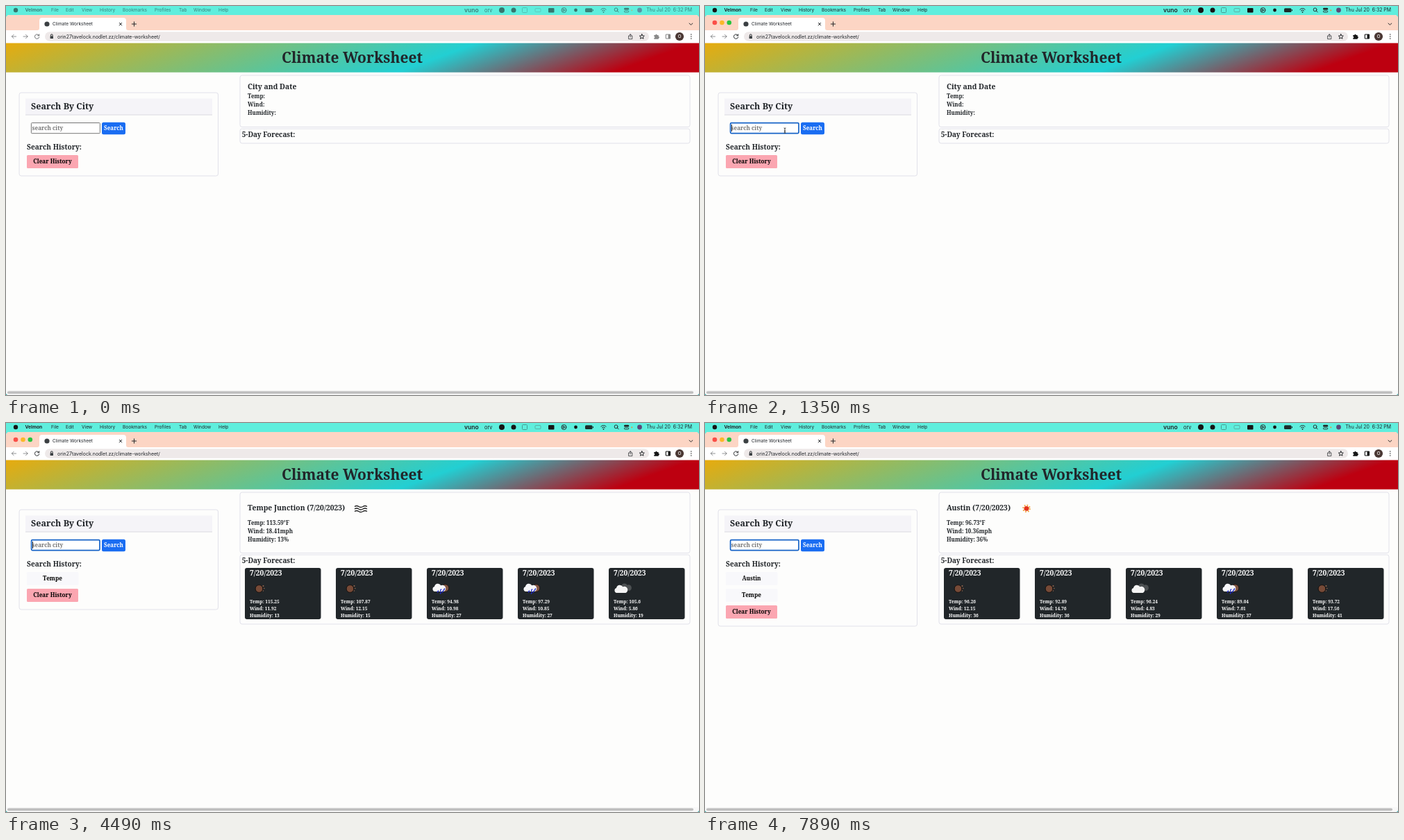
An HTML page that plays this animation: 998 px wide and 561 px high, repeating every 8000 ms.

```html
<!DOCTYPE html>
<html lang="en">
<head>
<meta charset="utf-8">
<title>Climate Worksheet</title>
<style>
  html, body { margin: 0; width: 100%; height: 100%; overflow: hidden; background: #5feedd; }
  svg { display: block; width: 100vw; height: 100vh; }
  text { white-space: pre; }
  .slab { font-family: "Noto Serif", serif; font-weight: 900; fill: #212529; }
  .ui { font-family: Inter, Roboto, sans-serif; fill: #1f2328; }
  .line { fill: none; stroke: #26292c; stroke-width: 1; stroke-linecap: round; stroke-linejoin: round; }
  .panel { fill: none; stroke: #e1e1ea; stroke-width: 1; }
</style>
</head>
<body>
<svg id="stage" viewBox="0 0 998 561">
  <defs>
    <!-- 160 degree gradient line through the banner -->
    <linearGradient id="banner" gradientUnits="userSpaceOnUse" x1="434" y1="-104" x2="564" y2="253">
      <stop offset="0" stop-color="#e6ab0e"/>
      <stop offset=".61" stop-color="#22cfd3"/>
      <stop offset=".89" stop-color="#bd0010"/>
    </linearGradient>
    <g id="cloud"><path d="M-7 5a3.6 3.6 0 0 1-.5-7A5 5 0 0 1 1.8-3.8A4.2 4.2 0 0 1 6 5Z"/></g>
    <g id="clear">
      <circle r="5.4" fill="#764a37" stroke="#15100e" stroke-width="1"/>
      <g fill="#986a50"><circle cx="6" cy="-4" r="1"/><circle cx="7.3" cy="-.5" r=".8"/><circle cx="6" cy="3" r=".7"/></g>
    </g>
    <g id="rain">
      <circle cx="6" cy="-1" r="5.3" fill="#805440" stroke="#15100e" stroke-width=".8"/>
      <use href="#cloud" x="-2" y="-1" fill="#f6f6f8"/>
      <path d="M-4 3l-1 2M0 1l-1 2M3 3l-1 2M0 5l-1 2M5 0l-1 2" stroke="#1b25c8" stroke-width="1.5" stroke-linecap="round"/>
    </g>
    <g id="cloudy">
      <use href="#cloud" x="5" y="-2" fill="#4c5052" transform="scale(.9)"/>
      <use href="#cloud" x="-2" y="1" fill="#f4f4f4"/>
    </g>
    <g id="mist"><path d="M-9-3.5q3-2 6 0t6 0t6 0M-9 0q3-2 6 0t6 0t6 0M-9 3.5q3-2 6 0t6 0t6 0" fill="none" stroke="#222" stroke-width="1.3"/></g>
    <g id="sun">
      <circle r="4.5" fill="none" stroke="#f2a23a" stroke-width="2.6" stroke-dasharray="1.5 2.03"/>
      <circle r="3.4" fill="#e5331d"/>
    </g>
  </defs>
  <g id="shell"></g>
  <g id="page"></g>
  <g id="arrow"><path d="M0 0V8L1.8 6.4L3 9.2L4.3 8.6L3.1 5.9H5.5Z" fill="#111" stroke="#fff" stroke-width=".6"/></g>
  <g id="beam"><path d="M-1.4-3.6Q0-3.6 0-2.6Q0-3.6 1.4-3.6M0-2.6V2.8M-1.4 3.8Q0 3.8 0 2.8Q0 3.8 1.4 3.8M-1 .9H1" fill="none" stroke="#222" stroke-width=".9"/></g>
</svg>
<script>
const LOOP = 8000;
const $ = id => document.getElementById(id);

const rect = (x, y, w, h, fill, r = 0, more = '') =>
  `<rect x="${x}" y="${y}" width="${w}" height="${h}" rx="${r}" fill="${fill}" ${more}/>`;
const dot = (x, y, r, fill) => `<circle cx="${x}" cy="${y}" r="${r}" fill="${fill}"/>`;
const line = (d, more = '') => `<path class="line" d="${d}" ${more}/>`;
const label = (cls, x, y, size, s, more = '') =>
  `<text class="${cls}" x="${x}" y="${y}" font-size="${size}" ${more}>${s}</text>`;
const slab = (...a) => label('slab', ...a);
const ui = (...a) => label('ui', ...a);
const panel = (x, y, w, h) => `<rect class="panel" x="${x}" y="${y}" width="${w}" height="${h}" rx="3"/>`;
const icon = (id, x, y) => `<use href="#${id}" x="${x}" y="${y}"/>`;
const middle = 'text-anchor="middle"';

function menuBar() {
  const items = [[65, 'File'], [86, 'Edit'], [109, 'View'], [135, 'History'], [168, 'Bookmarks'],
    [214, 'Profiles'], [249, 'Tab'], [270, 'Window'], [306, 'Help']];
  return dot(14, 6, 3.2, '#151515') +
    ui(27.5, 8.4, 6.7, 'Velmon', 'font-weight="700"') +
    items.map(([x, s]) => ui(x, 8.4, 6.6, s)).join('') +
    ui(660, 8.8, 8.6, 'vuno', 'font-weight="600"') +
    ui(689, 8.6, 7.4, 'orv') +
    dot(714, 6, 4, '#151515') + dot(731, 6, 3.5, '#151515') +
    `<g opacity=".4">${rect(743.5, 2.5, 7, 7, 'none', 1, 'stroke="#222"')}${rect(762, 3.5, 8, 5, 'none', 1, 'stroke="#555"')}</g>` +
    rect(781, 3, 8.5, 6.5, '#151515', 1) +
    line('M807 6a3.5 3.5 0 1 0-7 0a3.5 3.5 0 1 0 7 0M802.5 4.4L805.2 6L802.5 7.6Z') +
    dot(820.5, 6, 2.4, '#151515') +
    rect(834, 3.2, 10.5, 5.8, '#1b2c2a', 1.5) + rect(845, 5, 1, 2.2, '#1b2c2a') +
    line('M856.8 5a5 5 0 0 1 7.4 0M858.4 6.8a3 3 0 0 1 4.2 0', 'stroke-width="1.3"') + dot(860.5, 8.8, .9, '#151515') +
    line('M881 5.3a2.4 2.4 0 1 0-4.8 0a2.4 2.4 0 1 0 4.8 0M880.4 7L882.2 8.9') +
    rect(890, 2.8, 7.2, 2.8, '#222', 1.4) + rect(890.4, 6.8, 6.4, 2.2, 'none', 1.1, 'stroke="#222" stroke-width=".8"') +
    dot(901.3, 6.3, 1, '#f08b36') + dot(912.5, 6, 3.4, '#5b4a78') +
    ui(988, 8.4, 6.9, 'Thu Jul 20  6:32 PM', 'text-anchor="end"');
}

function browser(active) {
  const fade = active ? 1 : .5;
  const lights = active ? dot(14, 24, 3.3, '#fb4f48') + dot(24.5, 24, 3.3, '#fbb829') + dot(34.8, 24, 3.3, '#2ac440') : '';
  return rect(0, 0, 998, 561, '#5feedd') + rect(0, 545, 998, 16, '#18a8a4') +
    `<g opacity="${active ? 1 : .55}">${menuBar()}</g>` +
    rect(0, 13, 998, 548, '#fdfdfc', 5) +
    `<path d="M0 36V18Q0 13 5 13H993Q998 13 998 18V36Z" fill="#fcd5c4"/>` + lights +
    `<path d="M45 35Q48 35 48 32V21Q48 17 52 17H169Q173 17 173 21V32Q173 35 176 35Z" fill="#fff"/>` +
    rect(0, 35, 998, 18.5, '#fff') +
    dot(59, 26, 3.6, '#3b4043') +
    ui(67, 28.3, 6.5, 'Climate Worksheet') +
    line('M163.2 24.3L166.8 27.9M166.8 24.3L163.2 27.9') +
    line('M181.3 26H187.7M184.5 22.8V29.2') + line('M984 25L986.4 27.2L988.8 25') +
    line('M14.6 44H8.4M11.2 41.2L8.4 44L11.2 46.8M25 44H31.2M28.4 41.2L31.2 44L28.4 46.8', 'opacity=".5"') +
    line('M47.3 42.2A3.2 3.2 0 1 0 47.8 44.8M47.8 40.8V42.8H45.7', `opacity="${active ? 1 : .65}" stroke-width="1.2"`) +
    rect(56, 37.2, 870, 13.6, '#eee9e9', 6.8) +
    rect(63.6, 43.2, 4.4, 3.8, '#3c4043', .6) + line('M64.4 43V42.2a1.4 1.4 0 0 1 2.8 0V43', 'stroke-width=".8"') +
    ui(74, 46.6, 7, 'orin27tavelock.nodlet.zz/climate-worksheet/') +
    line('M897.8 43H896.6V47.6H901.8V43H900.6M899.2 45V40.8M897.7 42.2L899.2 40.7L900.7 42.2', 'stroke-width=".8" opacity=".75"') +
    line('M915.8 40.6L916.8 42.9L919.3 43.1L917.4 44.8L918 47.2L915.8 45.9L913.6 47.2L914.2 44.8L912.3 43.1L914.8 42.9Z', 'stroke-width=".8"') +
    `<g opacity="${fade}">` +
    `<path d="M933.3 42h2a1.2 1.2 0 0 1 2.4 0h2v2a1.2 1.2 0 0 1 0 2.4v1.3h-6.4v-1.6a1.1 1.1 0 0 0 0-2.2z" fill="#151515"/>` +
    rect(950.3, 41, 6.2, 6, 'none', .6, 'stroke="#151515" stroke-width="1.1"') + rect(953.5, 41, 3, 6, '#151515') + '</g>' +
    dot(970, 44, 6.1, '#4a3733') + ui(970, 46.4, 6.6, 'O', middle + ' style="fill:#fff"') +
    [41, 44, 47].map(y => dot(986.7, y, .8, '#333')).join('') +
    rect(0, 53.5, 998, 42.2, 'url(#banner)') +
    slab(498.5, 82, 21, 'Climate Worksheet', middle) +
    rect(0, 554, 998, 7, '#f8f8f8', 3) + rect(2, 555.6, 988, 3.6, '#bfbfbf', 1.8);
}

const COLUMNS = [344, 475, 606, 737, 868];
const REPORTS = {
  tempe: {
    title: 'Tempe Junction (7/20/2023)', now: ['113.59°F', '18.41mph', '13%'], icon: ['mist', 511, 124],
    days: [['clear', 115.25, 11.92, 13], ['clear', 107.87, 12.15, 15], ['rain', 94.98, 10.98, 27],
      ['rain', 97.29, 10.85, 27], ['cloudy', 105.6, 5.86, 19]]
  },
  austin: {
    title: 'Austin (7/20/2023)', now: ['96.73°F', '10.36mph', '36%'], icon: ['sun', 463, 123.3],
    days: [['clear', 96.26, 12.15, 36], ['clear', 92.89, 14.76, 36], ['cloudy', 96.24, 4.83, 29],
      ['rain', 89.04, 7.61, 37], ['clear', 93.72, 17.56, 41]]
  }
};
const FIELDS = ['Temp:', 'Wind:', 'Humidity:'];

function forecastCard([sky, ...values], i) {
  const x = COLUMNS[i];
  const white = 'style="fill:#fff"';
  return rect(x, 209, 109.5, 74, '#212629', 3) +
    slab(x + 7, 219.6, 10.4, '7/20/2023', white) + icon(sky, x + 20.5, 239) +
    FIELDS.map((f, n) => slab(x + 7, 260 + n * 10.1, 6.6, `${f} ${values[n]}`, white)).join('');
}

function searchPanel(s) {
  const bottom = 245 + 24 * s.history.length;
  const clearY = 215 + 24 * s.history.length;
  const box = s.active
    ? rect(36.6, 168.6, 98.4, 15, '#fff', 1.5, 'stroke="#1663c7" stroke-width="1.7"')
    : rect(36.4, 168.5, 99, 15.2, '#fff', 1, 'stroke="#767676" stroke-width="1"');
  return panel(19, 125, 286.5, bottom - 125) +
    rect(28, 133.5, 269, 23.5, '#f5f4f8') + rect(28, 156.5, 269, 1, '#dcdce2') +
    slab(36, 149.3, 12.5, 'Search By City') + box +
    slab(37.6, 179, 8.1, s.typed || 'search city', `id="entry" style="fill:${s.typed ? '#111' : '#777'}"`) +
    rect(138, 167.7, 34, 17.5, '#1a6df2', 2.5) + slab(155, 179.3, 8, 'Search', middle + ' style="fill:#fff"') +
    slab(30, 207.3, 10.1, 'Search History:') +
    s.history.map((name, i) => rect(30, 215 + 24 * i, 74.5, 19, '#f8f8fb', 1.5) +
      slab(67, 227.3 + 24 * i, 8.2, name, middle + ' style="fill:#000"')).join('') +
    rect(30, clearY, 74, 19, '#fba6b1', 1.5) +
    slab(67, clearY + 12.3, 8.2, 'Clear History', middle + ' style="fill:#000"');
}

function resultPanel(s) {
  const now = REPORTS[s.now];
  const days = REPORTS[s.days];
  const shift = now ? 13 : 0;
  const firstRow = now ? 147 : 133;
  return panel(337, 100, 648, 74.5 + shift) +
    slab(348, now ? 126.3 : 120.3, 10.4, now ? now.title : 'City and Date') +
    FIELDS.map((f, i) => slab(348, firstRow + i * 12, 8, now ? `${f} ${now.now[i]}` : f)).join('') +
    (s.icon ? icon(...now.icon) : '') +
    panel(337, 177 + shift, 648, days ? 100 : 21) +
    slab(339.7, 188.7 + shift, 10, '5-Day Forecast:') +
    (days ? days.days.map(forecastCard).join('') : '');
}

// Each step is [time, value]; the last one already reached counts.
const at = (t, steps) => steps.reduce((v, [when, value]) => t >= when ? value : v, steps[0][1]);

const FOCUS = 1330;
const TYPED = [[0, ''], [2090, 'T'], [2190, 'Te'], [2290, 'Tem'], [2390, 'Temp'], [2490, 'Tempe'], [3000, ''],
  [5750, 'A'], [5800, 'Au'], [5840, 'Aus'], [6050, 'Aust'], [6120, 'Austi'], [6200, 'Austin'], [7700, '']];
const HISTORY = [[0, []], [2790, ['Tempe']], [7470, ['Austin', 'Tempe']]];
const NOW = [[0, ''], [3000, 'tempe'], [7700, 'austin']];
const DAYS = [[0, ''], [3080, 'tempe'], [7790, 'austin']];
const ICON = [[0, false], [3200, true], [7700, false], [7890, true]];
// The caret blinks every half second, starting anew with each key.
const CARET = [[0, 0], [FOCUS, FOCUS], [2090, 2090], [2490, 2490], [5750, 5750], [6200, 6200]];
const POINTER = [[400, 190, 561], [600, 131, 251], [950, 118, 186], [1190, 115, 179.5]];

const caretOn = t => t >= FOCUS && Math.floor((t - at(t, CARET)) / 500) % 2 === 0;

function pointer(t) {
  if (t < POINTER[0][0] || t >= 2090) return null;
  const n = POINTER.findIndex(p => t < p[0]);
  if (n < 0) return POINTER[POINTER.length - 1].slice(1);
  const [a, b] = [POINTER[n - 1], POINTER[n]];
  const u = (t - a[0]) / (b[0] - a[0]);
  const k = 1 - (1 - u) ** 1.6;
  return [1, 2].map(i => a[i] + (b[i] - a[i]) * k);
}

let shellKey, pageKey;

function render(t) {
  const s = {
    active: t >= FOCUS, typed: at(t, TYPED), history: at(t, HISTORY),
    now: at(t, NOW), days: at(t, DAYS), icon: at(t, ICON), caret: caretOn(t)
  };
  if (shellKey !== s.active) {
    shellKey = s.active;
    $('shell').innerHTML = browser(s.active);
  }
  const key = JSON.stringify(s);
  if (pageKey !== key) {
    pageKey = key;
    $('page').innerHTML = searchPanel(s) + resultPanel(s);
    if (s.caret) {
      const x = 38 + (s.typed ? $('entry').getComputedTextLength() : 0);
      $('page').insertAdjacentHTML('beforeend', rect(x, 171, .9, 10, '#111'));
    }
  }
  const p = pointer(t);
  const inField = p && p[1] < 184;
  for (const [id, shown] of [['arrow', p && !inField], ['beam', inField]]) {
    $(id).style.display = shown ? '' : 'none';
    if (shown) $(id).setAttribute('transform', `translate(${p})`);
  }
}

const start = performance.now();
function tick() {
  render((performance.now() - start) % LOOP);
  requestAnimationFrame(tick);
}
tick();
</script>
</body>
</html>
```
